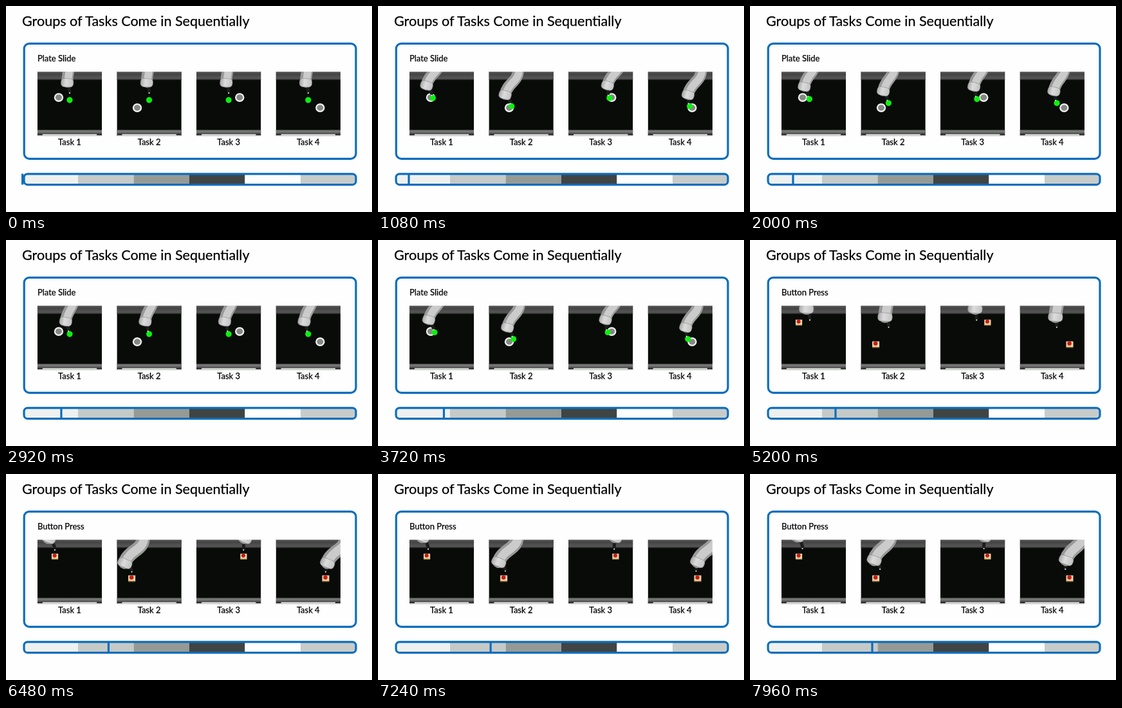
These frames come from a looping animation (569x320 px, 8 s). An HTML page:

```html
<!DOCTYPE html>
<html lang="en">
<head>
<meta charset="utf-8">
<title>Groups of Tasks</title>
<style>
html, body { margin: 0; width: 100%; height: 100%; overflow: hidden; background: #fdfefd; }
svg.stage { display: block; width: 100vw; height: 100vh; }
text { font-family: Lato, sans-serif; font-size: 13px; fill: #000; stroke: #000; stroke-width: .25; }
.title { font-size: 21.55px; }
.frame { fill: none; stroke: #0c6dbd; stroke-width: 3.2; }
.arm { fill: none; stroke-linecap: round; stroke-linejoin: round; }
</style>
</head>
<body>
<svg class="stage" viewBox="0 0 569 320">
  <defs>
    <linearGradient id="back" x2="0" y2="1">
      <stop offset="0" stop-color="#6c6c6c"/>
      <stop offset=".25" stop-color="#424242"/>
      <stop offset=".8" stop-color="#565656"/>
      <stop offset="1" stop-color="#222"/>
    </linearGradient>
    <linearGradient id="front" x2="0" y2="1">
      <stop offset="0" stop-color="#383838"/>
      <stop offset=".3" stop-color="#808080"/>
      <stop offset="1" stop-color="#555"/>
    </linearGradient>
    <linearGradient id="band">
      <stop offset="0" stop-color="#a8a8a8"/>
      <stop offset=".4" stop-color="#dcdcdc"/>
      <stop offset="1" stop-color="#c2c2c2"/>
    </linearGradient>
  </defs>
  <text class="title" x="25" y="30.5">Groups of Tasks Come in Sequentially</text>
  <rect class="frame" x="28.2" y="58.3" width="515.8" height="179" rx="8"/>
  <text id="label" x="49" y="85.5"></text>
  <g id="tiles"></g>
  <g id="segments"></g>
  <rect class="frame" x="28" y="260.8" width="516" height="16.8" rx="5.5"/>
  <path id="marker" class="frame" d="M0 260.5V277.5"/>
</svg>
<script>
const LOOP = 8000, SWITCH = 4240;
const PLATE_CYCLE = SWITCH / 3, BUTTON_CYCLE = 850;
const PUCK_HOME = [50, 44];
const byId = id => document.getElementById(id);

function set(el, attrs) {
  for (const k in attrs) el.setAttribute(k, attrs[k]);
}
function add(parent, tag, attrs, text) {
  const el = document.createElementNS('http://www.w3.org/2000/svg', tag);
  set(el, attrs);
  if (text) el.textContent = text;
  parent.appendChild(el);
  return el;
}

const mix = (a, b, u) => a.map((v, i) => v + (b[i] - v) * u);
const span = (t, from, to) => Math.max(0, Math.min(1, (t - from) / (to - from)));

// Goals sit left or right of the centre, alternating far and near.
function makeTask(i) {
  const side = i < 2 ? -1 : 1, near = i % 2;
  return {
    plate: [50 + side * (17 + 1.5 * near), 40 + 16 * near],
    button: [50 + side * (23 + 4 * near), 26 + 34 * near],
    size: 1 + .08 * near
  };
}

function buildTile(task, i) {
  const x = 48.8 + i * 123.6;
  const svg = add(byId('tiles'), 'svg', { x, y: 102, width: 100.4, height: 100.2, viewBox: '0 0 100 100', preserveAspectRatio: 'none' });
  const box = (x, y, width, height, fill, parent = svg) => add(parent, 'rect', { x, y, width, height, fill });
  const disc = (r, fill, parent = svg) => add(parent, 'circle', { r, fill });

  box(0, 0, 100, 100, '#090b09');
  box(0, 0, 100, 13, 'url(#back)');
  box(0, 90, 100, 6, 'url(#front)');
  box(0, 96.5, 100, 3.5, '#d0d2d0');
  box(0, 96.5, 8, 2, '#222');
  box(92, 96.5, 8, 2, '#222');

  task.plateArt = add(svg, 'g', { transform: `translate(${task.plate})` });
  add(task.plateArt, 'ellipse', { rx: 6.1, ry: 5.7, fill: '#858885', stroke: '#f1f3f1', 'stroke-width': 2.2 });
  task.puckArt = disc(4.6, '#0cf010', task.plateArt);

  task.buttonArt = add(svg, 'g', { transform: `translate(${task.button}) scale(${task.size})` });
  box(-5, -4.3, 10.2, 8.2, '#ecd49c', task.buttonArt);
  box(-5, 3.7, 10.2, 1.3, '#8f7647', task.buttonArt);
  add(task.buttonArt, 'circle', { cx: -.3, cy: -1.2, r: 3, fill: '#cb181e' });

  task.hand = add(svg, 'path', { class: 'arm', stroke: '#1b1d1b', 'stroke-width': 5 });
  task.shade = add(svg, 'path', { class: 'arm', stroke: '#999' });
  task.light = add(svg, 'path', { class: 'arm', stroke: '#cbcbcb', transform: 'translate(1.2 -.6)' });
  task.band = add(svg, 'rect', { height: 13, y: -6, rx: 5, fill: 'url(#band)', stroke: '#8c8c8c', 'stroke-width': .6 });
  task.tip = disc(1.1, '#dfe3df');
  add(byId('tiles'), 'text', { x: x + 50.2, y: 215.5, 'text-anchor': 'middle' }, `Task ${i + 1}`);
}

// The wrist follows the tip; lean bends the arm to the right as it reaches out.
function drawArm(task, [tx, ty], lean, width) {
  const wx = tx - 3 + (tx - 53) * .25;
  const wy = ty - 22 + ty * .14;
  const at = (dx, dy) => `${wx + lean * dx} ${wy + dy}`;
  const d = `M${at(0, 0)}C${at(.25, -20)} ${at(1.1, -18)} ${at(1, -42)}`;
  set(task.shade, { d, 'stroke-width': width });
  set(task.light, { d, 'stroke-width': width * .64 });
  set(task.band, { x: -width * .53, width: width * 1.06, transform: `translate(${wx} ${wy + 1}) rotate(${lean * .8})` });
  set(task.hand, { d: `M${wx + (tx - wx) * .6} ${wy + 6}L${tx} ${ty - 3}` });
  set(task.tip, { cx: tx, cy: ty });
}

function drawPlate(task, t) {
  const down = span(t, 0, 100), push = span(t, 120, 1320);
  const [px, py] = mix(PUCK_HOME, task.plate, push);
  const tip = mix([50, 33], [px - 2, py - 4], down);
  drawArm(task, tip, 4 + 9 * down + 9 * push, 18);
  set(task.puckArt, { cx: px - task.plate[0], cy: py - task.plate[1] });
}

function drawButton(task, t) {
  const [bx, by] = task.button;
  const reach = span(t, 0, 340), press = span(t, 340, 540);
  const hover = [bx + (50 - bx) * .2, by - 13];
  const tip = mix(mix([50, 27], hover, reach), [bx, by - 10], press);
  drawArm(task, tip, 2 + 26 * reach * reach, 21);
}

function draw(t) {
  const plates = t < SWITCH;
  byId('label').textContent = plates ? 'Plate Slide' : 'Button Press';
  set(byId('marker'), { transform: `translate(${25.6 + t * .02065} 0)` });
  for (const task of tasks) {
    set(task.plateArt, { display: plates ? 'inline' : 'none' });
    set(task.buttonArt, { display: plates ? 'none' : 'inline' });
    if (plates) drawPlate(task, t % PLATE_CYCLE);
    else drawButton(task, (t - SWITCH) % BUTTON_CYCLE);
  }
}

const tasks = Array.from({ length: 4 }, (_, i) => makeTask(i));
tasks.forEach(buildTile);
['#eef1ef', '#c6cac7', '#969a95', '#404443', '#fdfefd', '#c8ccc9'].forEach((fill, i) => {
  const x = i ? 25.5 + i * 86.5 : 28;
  add(byId('segments'), 'rect', { x, y: 261.5, width: Math.min(112 + i * 86.5, 543) - x, height: 15.5, fill });
});

const begin = performance.now();
function tick() {
  draw((performance.now() - begin) % LOOP);
  requestAnimationFrame(tick);
}
tick();
</script>
</body>
</html>
```
